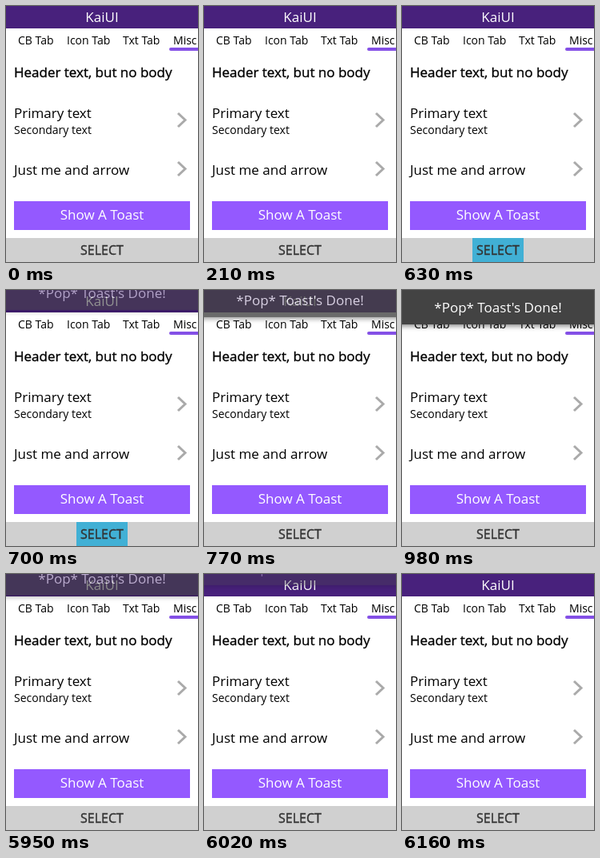
Recreate the animation shown at these times as an HTML page. Size 240 by 320 pixels, loop 6510 ms.

```html
<!DOCTYPE html>
<html lang="en">
<head>
<meta charset="utf-8">
<title>Toast demo</title>
<style>
  html, body { margin: 0; width: 100%; height: 100%; overflow: hidden; background: #fff; }
  svg { display: block; width: 100%; height: 100%; font: 17px "Open Sans", sans-serif; }
  .mid { text-anchor: middle; }
  .small { font-size: 14px; }
  .white { fill: #fff; }
  .strong { stroke: #000; stroke-width: .35px; }
  .arrow { fill: none; stroke: #aaa; stroke-width: 3px; }
  #toast rect { filter: drop-shadow(0 2px 3px rgba(0, 0, 0, .5)); }
</style>
</head>
<body>
<svg viewBox="0 0 240 320">
  <rect width="240" height="320" fill="#fff"/>
  <rect width="240" height="28" fill="#48217c"/>
  <text class="mid white" x="120" y="20">KaiUI</text>

  <g class="small">
    <text x="15" y="48">CB Tab</text>
    <text x="76" y="48">Icon Tab</text>
    <text x="146" y="48">Txt Tab</text>
    <text x="209" y="48">Misc</text>
  </g>
  <rect x="204" y="52" width="40" height="4" rx="2" fill="#8450e6"/>

  <text class="strong" x="10" y="89">Header text, but no body</text>
  <text x="10" y="140">Primary text</text>
  <text class="small" x="10" y="160">Secondary text</text>
  <text x="10" y="211">Just me and arrow</text>
  <path class="arrow" d="M215 134l9 8.5-9 8.5M215 195l9 8.5-9 8.5"/>

  <rect x="10" y="244" width="220" height="36" fill="#9459ff"/>
  <text class="mid white" x="120" y="267">Show A Toast</text>

  <rect y="290" width="240" height="30" fill="#d0d0d0"/>
  <rect id="press" x="88" y="290" width="64" height="30" fill="#41b0d5"/>
  <text class="mid" x="120" y="311" font-size="16" fill="#333" stroke="#333" stroke-width=".4">SELECT</text>

  <g id="toast">
    <rect x="-8" y="-10" width="256" height="53" fill="#434343"/>
    <text class="mid white" x="120" y="28">*Pop* Toast's Done!</text>
  </g>
</svg>
<script>
  const LOOP = 6510, STEP = 70, HEIGHT = 43;
  const SHOW = 700, SHOWN = 980, HIDE = 5950, HIDDEN = 6160;
  const press = document.getElementById('press');
  const toast = document.getElementById('toast');

  // Share of the toast that is still hidden: 0 is fully shown, 1 is gone.
  function hiddenShare(t) {
    if (t < SHOW || t >= HIDDEN) return 1;
    if (t < SHOWN) return 0.42 * 0.5 ** ((t - SHOW) / STEP);
    if (t < HIDE) return 0;
    return 1 - 0.62 * (1 - (t - HIDE) / (HIDDEN - HIDE)) ** 1.6;
  }

  function draw(now) {
    const t = Math.floor(now % LOOP / STEP) * STEP;
    const hidden = hiddenShare(t);
    press.setAttribute('visibility', t >= 630 && t < 770 ? 'visible' : 'hidden');
    toast.setAttribute('visibility', hidden < 1 ? 'visible' : 'hidden');
    toast.setAttribute('transform', `translate(0 ${-HEIGHT * hidden})`);
    toast.setAttribute('opacity', 1 - hidden);
    requestAnimationFrame(draw);
  }
  draw(performance.now());
</script>
</body>
</html>
```
